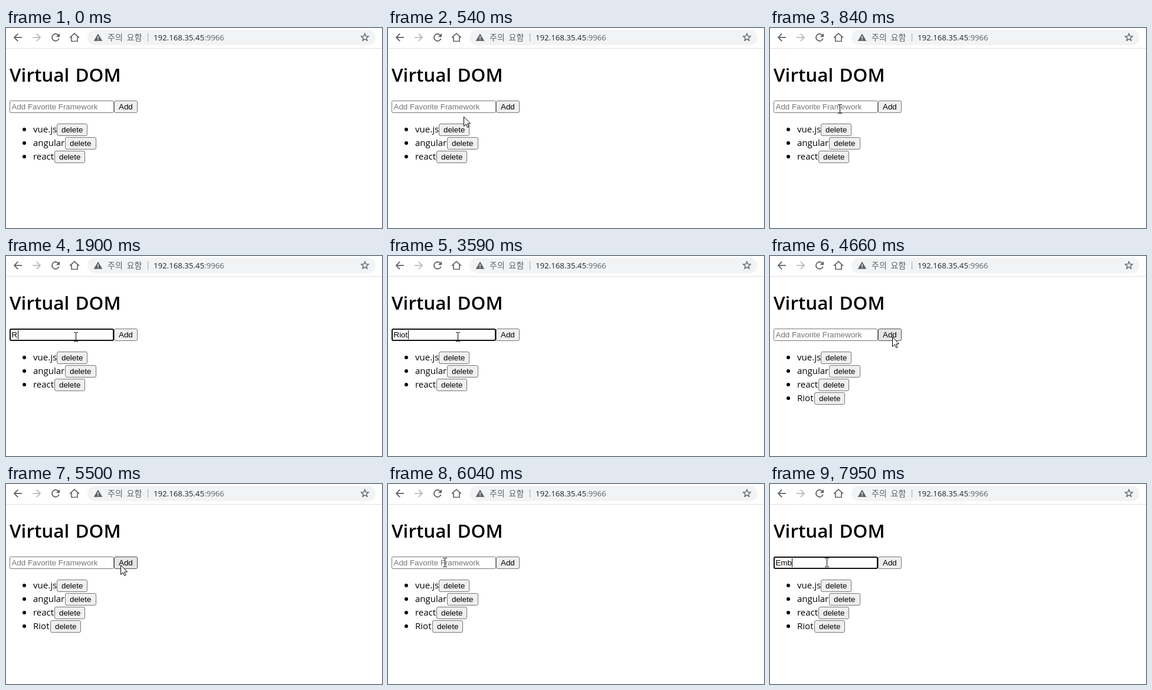
An HTML page with a canvas for the animation above (8000 ms loop, 637 by 339 pixels).

```html
<!DOCTYPE html>
<html lang="ko">
<head>
<meta charset="utf-8">
<title>Virtual DOM</title>
<style>
  html, body { margin: 0; width: 100%; height: 100%; overflow: hidden; background: #fff; }
  canvas { display: block; }
</style>
</head>
<body>
<canvas id="stage" width="637" height="339"></canvas>
<script>
const ctx = document.getElementById('stage').getContext('2d');
const LOOP = 8000, STEP = 75;
const GREY = '#5f6368';
const FORM = '13.333px "Liberation Sans", Arial, sans-serif';
const BODY = '15px "Open Sans", sans-serif';
const HEAD = '600 31.5px "Open Sans", sans-serif';
const URL_FONT = '13.2px "Open Sans", sans-serif';
const KOREAN = '14px "Noto Sans CJK KR", "Noto Sans CJK", sans-serif';

// Pointer moves: start time and one position per step
const moves = [
  { at: 230, path: [[288, 265], [225, 222], [180, 188], [147, 163], [128, 150], [122, 143], [119, 139], [118, 137], [118, 137]] },
  { at: 4060, path: [[150, 141], [190, 150], [204, 153], [206, 150], [207, 145], [207, 141], [207, 138], [207, 138], [207, 137]] },
  { at: 5420, path: Array.from({ length: 9 }, (_, i) => {
    const k = (1 - Math.cos(Math.PI * (i + 1) / 9)) / 2;
    return [Math.round(207 - 111 * k), Math.round(137 - 4 * k)];
  }) }
];

// Input states: [start, focused, value, caret]
const states = [
  [0, false, '', false],
  [990, true, '', true],
  [1450, true, '', false],
  [1900, true, 'R', true],
  [2060, true, 'Ri', true],
  [2360, true, 'Rio', true],
  [2520, true, 'Riot', true],
  [3060, true, 'Riot', false],
  [3590, true, 'Riot', true],
  [4060, true, 'Riot', false],
  [4590, false, 'Riot', false],
  [4660, false, '', false],
  [6580, true, '', true],
  [7120, true, '', false],
  [7570, true, 'E', true],
  [7650, true, 'Em', true],
  [7950, true, 'Emb', true]
];
const ADDED = 4660;
const items = [['vue.js', 86, 52], ['angular', 100, 53], ['react', 82, 52], ['Riot', 75, 52]];

function text(str, x, y, font, color = '#000') {
  ctx.font = font;
  ctx.fillStyle = color;
  ctx.fillText(str, x, y);
  return ctx.measureText(str).width;
}

function box(x, y, w, h, r, fill, stroke, line = 1) {
  ctx.beginPath();
  ctx.roundRect(x, y, w, h, r);
  if (fill) { ctx.fillStyle = fill; ctx.fill(); }
  if (stroke) outline(stroke, line);
}

function shape(points, x = 0, y = 0) {
  ctx.beginPath();
  points.forEach(([px, py]) => ctx.lineTo(x + px, y + py));
}

function outline(color, width) {
  ctx.strokeStyle = color;
  ctx.lineWidth = width;
  ctx.stroke();
}

function fill(color) {
  ctx.fillStyle = color;
  ctx.fill();
}

function arrow(x, y, dir, color) {
  shape([[7 * dir, 0], [-6 * dir, 0]], x, y);
  outline(color, 1.8);
  shape([[0.2 * dir, -6.3], [-6 * dir, 0], [0.2 * dir, 6.3]], x, y);
  outline(color, 1.8);
}

function reload(x, y) {
  ctx.beginPath();
  ctx.arc(x, y, 6, 0.3, Math.PI * 1.77);
  outline(GREY, 1.8);
  shape([[7, -7], [7, -0.8], [0.8, -0.8]], x, y);
  fill(GREY);
}

function home(x, y) {
  shape([[-8, 0.6], [0, -6.8], [8, 0.6]], x, y);
  outline(GREY, 1.7);
  shape([[-5, -1.5], [-5, 6.5], [5, 6.5], [5, -1.5]], x, y);
  outline(GREY, 1.7);
}

function star(x, y) {
  shape(Array.from({ length: 10 }, (_, i) => {
    const a = i * Math.PI / 5 - Math.PI / 2, r = i % 2 ? 2.9 : 6.5;
    return [r * Math.cos(a), r * Math.sin(a)];
  }), x, y);
  ctx.closePath();
  outline(GREY, 1.4);
}

function toolbar() {
  ctx.fillStyle = '#dcdee3';
  ctx.fillRect(0, 34, 637, 1);
  arrow(20, 16, 1, GREY);
  arrow(52, 16, -1, '#babcbe');
  reload(84, 16);
  home(116, 16);
  box(138, 3, 488, 26, 13, '#f1f3f4');
  shape([[0, -6.5], [7.3, 6], [-7.3, 6]], 156, 16);
  fill(GREY);
  ctx.fillStyle = '#fff';
  ctx.fillRect(155.3, 14, 1.4, 4);
  ctx.fillRect(155.3, 19, 1.4, 1.5);
  text('주의', 172, 21, KOREAN, GREY);
  text('요함', 204.5, 21, KOREAN, GREY);
  ctx.fillStyle = '#a3a6aa';
  ctx.fillRect(240, 9, 1, 14);
  const w = text('192.168.35.45', 250, 21, URL_FONT, '#202124');
  text(':9966', 250 + w, 21, URL_FONT, GREY);
  star(608, 16);
}

function button(label, x, y, w, hover) {
  box(x + 0.5, y + 0.5, w - 1, 20, 2.5, hover ? '#e5e5e5' : '#efefef', hover ? '#4f4f4f' : '#767676');
  text(label, x + 8, y + 15, FORM);
}

function input([, focused, value, caret]) {
  if (focused) box(7, 124, 175, 19, 2, '#fff', '#101010', 2);
  else box(6.5, 123.5, 176, 20, 2, '#fff', '#767676');
  const w = value ? text(value, 9.5, 138, FORM) : 0;
  if (!value) text('Add Favorite Framework', 9.5, 138, FORM, '#757575');
  if (caret) {
    ctx.fillStyle = '#000';
    ctx.fillRect(Math.ceil(9.5 + w), 126, 1, 15);
  }
}

function list(count) {
  items.slice(0, count).forEach(([name, x, w], i) => {
    const y = 162 + 23 * i;
    ctx.beginPath();
    ctx.arc(31, y + 10, 3, 0, Math.PI * 2);
    fill('#000');
    text(name, 46, y + 15, BODY);
    button('delete', x, y, w);
  });
}

function pointerAt(t) {
  const move = moves.findLast(m => t >= m.at);
  if (!move) return null;
  const i = Math.floor((t - move.at) / STEP);
  return move.path[Math.min(i, move.path.length - 1)];
}

const inside = ([x, y], left, right) => x >= left && x < right && y >= 123 && y < 144;

function drawPointer([x, y]) {
  if (inside([x, y], 6, 183)) {
    ctx.fillStyle = '#000';
    ctx.fillRect(x, y - 7, 1, 14);
    for (const dy of [-8, 7]) {
      ctx.fillRect(x - 3, y + dy, 3, 1);
      ctx.fillRect(x + 1, y + dy, 3, 1);
    }
    return;
  }
  shape([[0.5, 0.5], [0.5, 16.5], [4.2, 13], [6.8, 18.5], [9, 17.5], [6.6, 12.2], [11.5, 11.8]], x, y);
  ctx.closePath();
  fill('#fff');
  outline('#000', 1);
}

function draw(now) {
  const t = now % LOOP;
  const pointer = pointerAt(t);
  ctx.fillStyle = '#fff';
  ctx.fillRect(0, 0, 637, 339);
  toolbar();
  text('Virtual', 6, 91, HEAD);
  text('DOM', 117.5, 91, HEAD);
  input(states.findLast(s => t >= s[0]));
  button('Add', 183, 123, 40, pointer && inside(pointer, 183, 223));
  list(t >= ADDED ? 4 : 3);
  if (pointer) drawPointer(pointer);
}

const start = performance.now();
function tick() {
  draw(performance.now() - start);
  requestAnimationFrame(tick);
}
tick();
</script>
</body>
</html>
```
